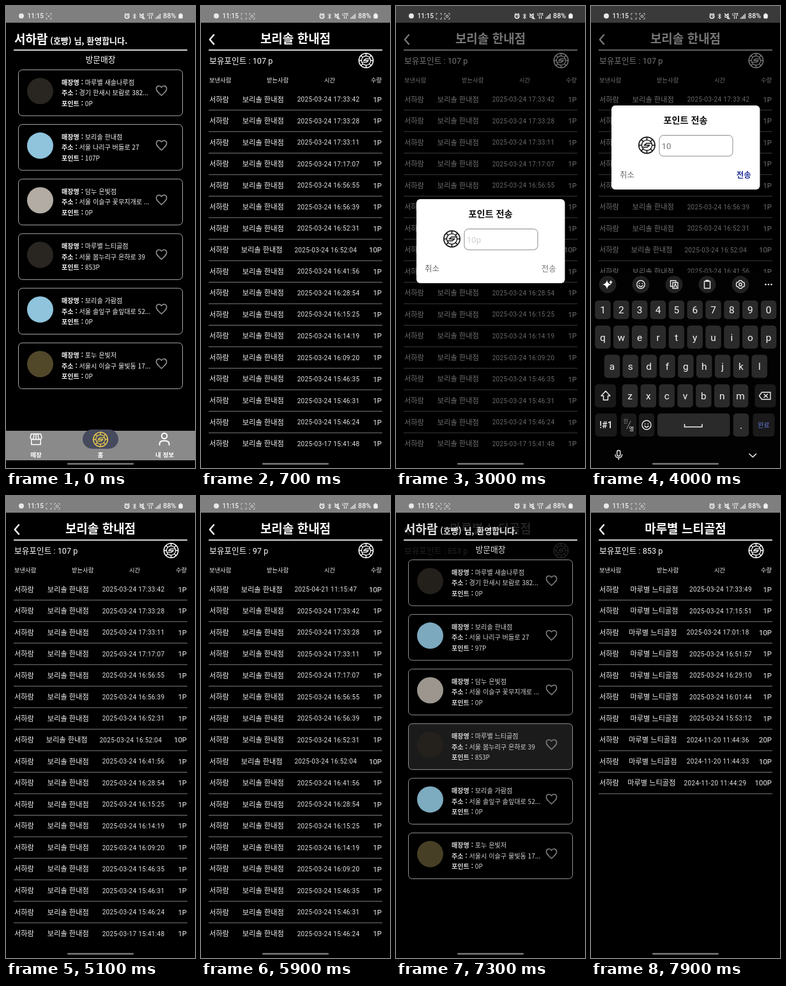
An HTML page that plays this animation: 296x720 px, repeating every 8 s.

```html
<!DOCTYPE html>
<html lang="ko">
<head>
<meta charset="utf-8">
<title>포인트 전송</title>
<style>
html, body { margin: 0; width: 100%; height: 100%; overflow: hidden; background: #000; }
svg { display: block; width: 100%; height: 100%; }
text { font-family: Roboto, "Noto Sans CJK KR", "Noto Sans CJK", sans-serif; white-space: pre; }
.ko { font-family: "Noto Sans CJK KR", "Noto Sans CJK", sans-serif; }
</style>
</head>
<body>
<svg id="stage" viewBox="0 0 296 720"></svg>
<script>
const LOOP = 8000;
const stage = document.getElementById('stage');

function add(parent, tag, attrs = {}) {
  const el = document.createElementNS('http://www.w3.org/2000/svg', tag);
  for (const k in attrs) el.setAttribute(k, attrs[k]);
  return parent.appendChild(el);
}
const group = (p, attrs) => add(p, 'g', attrs);
const rect = (p, x, y, width, height, fill, rx = 0, more) =>
  add(p, 'rect', { x, y, width, height, fill, rx, ...more });
const circle = (p, cx, cy, r, fill, more) => add(p, 'circle', { cx, cy, r, fill, ...more });
const line = (p, d, stroke, width, more) => add(p, 'path', {
  d, stroke, 'stroke-width': width, fill: 'none',
  'stroke-linecap': 'round', 'stroke-linejoin': 'round', ...more });

// y is the optical middle of the line
function text(p, x, y, str, size, fill = '#fff', more) {
  const el = add(p, 'text', { x, y: y + size * 0.365, 'font-size': size, fill, ...more });
  el.textContent = str;
  return el;
}
const mid = { 'text-anchor': 'middle' };
const bold = { 'font-weight': 700 };
const ko = { class: 'ko' };

// Lays out texts from 13 to 283 with equal gaps
function spread(items) {
  const widths = items.map(el => el.getComputedTextLength());
  const gap = (270 - widths.reduce((a, b) => a + b)) / (items.length - 1);
  let x = 13;
  items.forEach((el, i) => { el.setAttribute('x', x); x += widths[i] + gap; });
}

function chip(p, x, y, r, color) {
  const g = group(p, { transform: `translate(${x} ${y}) scale(${r / 12})` });
  circle(g, 0, 0, 11.2, 'none', { stroke: color, 'stroke-width': 1.5 });
  circle(g, 0, 0, 7.2, 'none', { stroke: color, 'stroke-width': 1.2 });
  for (let i = 0; i < 8; i++)
    line(g, 'M0 -11V-7.4', color, 1.4, { transform: `rotate(${i * 45})` });
  line(g, 'M6 -2.6H-.6L-3.8 0H3.8L.6 2.6H-6', color, 1.4);
}

/* ---------- home ---------- */
const me = '서하람';
const shops = [
  ['마루별 새솔나루점', '경기 한새시 보람로 382...', '0P', '#292520'],
  ['보리솔 한내점', '서울 나리구 버들로 27', '107P', '#8fc4dc'],
  ['담누 은빛점', '서울 이슬구 꽃무지개로 ...', '0P', '#b3aca4'],
  ['마루별 느티골점', '서울 봄누리구 은하로 39', '853P', '#292520'],
  ['보리솔 가람점', '서울 솔잎구 솔잎대로 52...', '0P', '#8fc4dc'],
  ['포누 은빛저', '서울시 이슬구 물빛동 17...', '0P', '#51482a']
];
rect(stage, 0, 0, 296, 720, '#000');
const home = group(stage);
text(home, 13, 52, me, 19, '#fff', { ...bold, ...ko });
text(home, 69, 54, '(호빵) 님, 환영합니다.', 13, '#fff', { ...bold, ...ko });
rect(home, 12, 67.8, 272, 1.7, '#fff');
text(home, 148, 83, '방문매장', 12.8, '#fff', { ...mid, ...ko });

const points = [], glow = [];
shops.forEach(([name, address, point, color], i) => {
  const g = group(home, { transform: `translate(0 ${i * 85.1})` });
  glow.push(rect(g, 19.5, 99.5, 257, 71.5, '#fff', 6, { opacity: 0 }));
  rect(g, 19.5, 99.5, 257, 71.5, 'none', 6, { stroke: '#a8a8a8' });
  circle(g, 53.5, 132.5, 20.5, color);
  [['매장명 : ', name], ['주소 : ', address], ['포인트 : ', point]].forEach(([label, value], n) => {
    const row = text(g, 87, 119 + n * 16.6, '', 10.1, '#f2f2f2', ko);
    add(row, 'tspan', bold).textContent = label;
    const span = add(row, 'tspan');
    span.textContent = value;
    if (n === 2) points.push(span);
  });
  line(g, 'M243.5 139.5C238 134.6 235.4 132.2 235.4 129C235.4 124.2 240.9 122.9 243.5 126.8C246.1 122.9 251.6 124.2 251.6 129C251.6 132.2 249 134.6 243.5 139.5Z', '#8c8c8c', 1.6);
});

const nav = group(home);
rect(nav, 0, 662, 296, 46, '#8a8a8a');
rect(nav, 120, 660, 56, 30, '#454a5d', 15);
chip(nav, 148, 675.5, 12, '#e8c94e');
line(nav, 'M39.5 667H54.5L56 672.5Q55 676 52.4 675Q50 676.5 47 675Q44.5 676.5 42 675Q39 676 38 672.5ZM39.8 676V683.5H54.2V676M44 667L43 674M50 667L51 674M47 667V674', '#fff', 1.5);
circle(nav, 248, 670, 4.2, 'none', { stroke: '#fff', 'stroke-width': 2 });
line(nav, 'M240.5 684V682Q241 677.5 248 677.5Q255 677.5 255.5 682V684', '#fff', 2);
[[47, '매장'], [148, '홈'], [248.5, '내 정보']].forEach(([x, s]) =>
  text(nav, x, 699, s, 9.6, '#fff', { ...mid, ...bold, ...ko }));

/* ---------- shop pages ---------- */
const day = (date, list) => list.split(' ').map(s => {
  const [time, n = 1] = s.split('/');
  return [`${date} ${time}`, n + 'P'];
});
const older = [
  ...day('2025-03-24', '17:33:42 17:33:28 17:33:11 17:17:07 16:56:55 16:56:39 16:52:31 16:52:04/10 16:41:56 16:28:54 16:15:25 16:14:19 16:09:20 15:46:35 15:46:31 15:46:24'),
  ...day('2025-03-17', '15:41:48')
];
const newer = [...day('2025-04-21', '11:15:47/10'), ...older.slice(0, 16)];
const other = [
  ...day('2025-03-24', '17:33:49 17:15:51 17:01:18/10 16:51:57 16:29:10 16:01:44 15:53:12'),
  ...day('2024-11-20', '11:44:36/20 11:44:33/10 11:44:29/100')
];

function page(shop, total, rows) {
  const g = group(stage);
  rect(g, 0, 26, 296, 682, '#000');
  line(g, 'M20 45L13.8 52.2L20 59.4', '#fff', 2.4);
  text(g, 148, 51.5, shop, 19, '#fff', { ...mid, ...bold, ...ko });
  rect(g, 12, 67.8, 272, 1.7, '#fff');
  text(g, 13, 85, `보유포인트 : ${total} p`, 12.7);
  chip(g, 258.5, 85, 12, '#fff');
  const list = group(g);
  spread(['보낸사람', '받는사람', '시간', '수량'].map(s =>
    text(list, 0, 116, s, 9.3, '#f0f0f0', { ...ko, 'font-weight': 500 })));
  rows.forEach(([time, amount], i) => {
    const y = 145.5 + i * 33.53;
    spread([
      text(list, 0, y, me, 11.2, '#f0f0f0', ko),
      text(list, 0, y, shop, 11.2, '#f0f0f0', ko),
      text(list, 0, y, time, 10, '#e4e4e4', { 'letter-spacing': 0.33 }),
      text(list, 0, y, amount, 11.4, '#f0f0f0')
    ]);
    if (i < 16) rect(list, 12, y + 16.2, 272, 1, '#7c7c7c');
  });
  return { g, list };
}
const before = page(shops[1][0], 107, older);
const after = page(shops[1][0], 97, newer);
const second = page(shops[3][0], 853, other);

/* ---------- status bar ---------- */
const bar = group(stage);
rect(bar, 0, 0, 296, 26, '#7f7f7f');
const shade = rect(stage, 0, 0, 296, 720, '#000');
const status = group(stage);
circle(status, 24, 15.5, 4, '#e8e8e8');
text(status, 33.5, 15.5, '11:15', 10, '#f2f2f2', { 'font-weight': 500 });
const frame = x => line(status, `M${x - 2.3} 11.5H${x - 4}V14M${x + 2.3} 11.5H${x + 4}V14M${x - 2.3} 20.5H${x - 4}V18M${x + 2.3} 20.5H${x + 4}V18`, '#dcdcdc', 0.8);
frame(67);
const dot = line(status, 'M65.5 14.5L68.5 17.5M68.5 14.5L65.5 17.5', '#dcdcdc', 0.9);
const extra = group(status);
extra.append(frame(80), circle(status, 80, 16, 1.8, 'none', { stroke: '#dcdcdc' }));
circle(status, 189.5, 16, 3.2, 'none', { stroke: '#f2f2f2', 'stroke-width': 1.6 });
line(status, 'M186 12.5L187.5 11.5M193 12.5L191.5 11.5M189.5 14.5V16H191', '#f2f2f2', 1);
line(status, 'M199 13.5L203.5 18L201.2 20V12L203.5 14L199 18.5', '#f2f2f2', 1);
line(status, 'M210 14.5H212L215 12V20L212 17.5H210ZM209.5 12L217 20', '#f2f2f2', 1.2);
text(status, 226, 12.8, 'LTE', 6, '#f2f2f2', { ...mid, ...bold });
line(status, 'M224.5 19.5V16M227.5 16V19.5', '#f2f2f2', 1.1);
for (let i = 0; i < 4; i++) rect(status, 234 + i * 2.2, 18 - i * 2, 1.5, 2 + i * 2, '#e0e0e0');
text(status, 246, 15.5, '88%', 10.8, '#f2f2f2', { 'font-weight': 500 });
rect(status, 270.3, 12.5, 6.5, 7, '#f2f2f2', 1.4);
rect(status, 272.2, 11.3, 2.6, 1.5, '#f2f2f2');

/* ---------- dialog ---------- */
const dialog = group(stage);
rect(dialog, 32, 301, 232.5, 131, '#fff', 6);
text(dialog, 148, 324, '포인트 전송', 14.2, '#111', { ...mid, ...bold, ...ko });
chip(dialog, 87.5, 363, 13.5, '#111');
rect(dialog, 107, 347.5, 115, 32.5, '#fff', 6.5, { stroke: '#8a8a8a' });
const input = text(dialog, 110.5, 364.5, '', 13.5);
const caret = rect(dialog, 110, 355.5, 1, 17, '#555');
text(dialog, 45, 409, '취소', 12.5, '#6a6a6a', ko);
const send = text(dialog, 227.8, 409, '전송', 12.5, '', ko);

/* ---------- keyboard ---------- */
const board = group(stage);
rect(board, 0, 416, 296, 304, '#020202');
const plain = '#2a2a2b', dark = '#1a1a1b', pressed = '#505256';
const keys = {};
function key(x, y, w, h, label, size = 15.5, fill = plain, color = '#f4f4f4', more) {
  keys[label] = rect(board, x - w / 2, y - h / 2, w, h, fill, 5);
  text(board, x, y, label, size, color, { ...mid, ...more });
}
const ink = (d, w = 1.4, color = '#eee') => line(board, d, color, w);
const face = (x, y, r) => {
  circle(board, x, y, r, 'none', { stroke: '#eee', 'stroke-width': 1.4 });
  ink(`M${x - 3} ${y + 1.5}Q${x} ${y + 5.5} ${x + 3} ${y + 1.5}`);
  for (const s of [-1, 1]) circle(board, x + s * 2.3, y - 1.7, 0.9, '#eee');
};
for (let i = 0; i < 5; i++) circle(board, 26 + i * 52, 434, 13.5, '#212122');
add(board, 'path', { fill: '#fff', d: 'M25 427Q26 433 32 434Q26 435 25 441Q24 435 18 434Q24 433 25 427ZM31 427L32 429.5L34 430.5L32 431.5L31 434L30 431.5L28 430.5L30 429.5Z' });
face(78, 434, 6.2);
ink('M127 437H124.5V428H133V430M128 431H136V440H128ZM130 438L132 433L134 438');
ink('M177.5 429H186.5V440H177.5ZM180 429V427.5H184V429');
circle(board, 234, 434, 2.2, 'none', { stroke: '#eee', 'stroke-width': 1.4 });
ink('M232 428H236L237 430L240 431L240.5 434L240 437L237 438L236 440H232L231 438L228 437L227.5 434L228 431L231 430Z');
for (let i = 0; i < 3; i++) circle(board, 273.5 + i * 4.5, 434, 1.3, '#eee');

[['1234567890', 18.5, 473.5, 29], ['qwertyuiop', 18.5, 516, 36],
 ['asdfghjkl', 33, 561.5, 36], ['zxcvbnm', 61, 607.5, 36]].forEach(([chars, x, y, h]) =>
  [...chars].forEach((c, i) => key(x + i * 28.85, y, 24.5, h, c)));
key(22.5, 607.5, 33, 36, '', 15, dark);
ink('M23 600L30 607.5H26.5V614H19.5V607.5H16Z');
key(273, 607.5, 33, 36, '', 15, dark);
ink('M267.5 602H281V613H267.5L263.5 607.5ZM271 605L276.5 610M276.5 605L271 610');
key(23.5, 653, 34, 36, '!#1', 14, dark, '#f4f4f4', { 'font-weight': 500 });
key(59, 653, 24.5, 36, '', 15, dark);
text(board, 54.5, 647.5, '한', 8, '#8a8a8a', { ...mid, ...ko });
text(board, 63.5, 659, '영', 8.5, '#eee', { ...mid, ...ko });
ink('M56 659L62 647', 0.9, '#aaa');
key(87, 653, 24.5, 36, '', 15, dark);
face(87, 653, 7);
rect(board, 104, 635, 113.5, 36, plain, 5);
ink('M146.5 652V656H174V652', 1.6);
key(235, 653, 24.5, 36, '.', 17);
key(270.5, 653, 34, 36, '완료', 10, dark, '#5f78cf');
rect(board, 40.8, 692.5, 5, 9, 'none', 2.5, { stroke: '#eee', 'stroke-width': 1.4 });
ink('M38 699Q38 704 43.3 704Q48.6 704 48.6 699M43.3 704V707');
ink('M248 698L253.3 703L258.6 698', 1.6);

rect(stage, 96, 712.3, 104, 2.4, '#7c7c7c', 1.2);

/* ---------- motion ---------- */
const ramp = (t, a, b) => Math.min(1, Math.max(0, (t - a) / (b - a)));
const ease = p => 1 - (1 - p) ** 3;
const within = (t, a, b) => t >= a && t < b;
const fade = (el, v) => {
  el.setAttribute('opacity', v);
  el.setAttribute('visibility', v > 0 ? 'visible' : 'hidden');
};
const shift = (el, y) => el.setAttribute('transform', `translate(0 ${y})`);
// The list arrives after the page has begun to fade in
function show(p, v, loaded) {
  fade(p.g, v);
  p.list.setAttribute('visibility', v > 0 && loaded ? 'visible' : 'hidden');
}

function draw(t) {
  const sent = t >= 5200;
  const first = ramp(t, 540, 695) * (1 - ramp(t, 6700, 6900));
  show(before, sent ? 0 : first, t >= 660);
  show(after, sent ? first : 0, true);
  show(second, ramp(t, 7280, 7440), t >= 7400);

  points[1].textContent = sent ? '97P' : '107P';
  fade(glow[1], t < 800 ? 0.11 * ramp(t, 200, 350) : 0);
  fade(glow[3], 0.12 * ramp(t, 7050, 7200));
  fade(nav, t < 450 || within(t, 6850, 7200) ? 1 : 0);

  const open = ramp(t, 2550, 2750) * (1 - ramp(t, 4750, 4950));
  fade(shade, 0.54 * open);
  fade(dialog, open);

  const up = ease(ramp(t, 3250, 3550)) * (1 - ease(ramp(t, 4350, 4700)));
  shift(dialog, -146 * up);
  shift(board, 304 * (1 - up));
  fade(board, up > 0 ? 1 : 0);

  const typed = t < 3680 ? '' : t < 3880 ? '1' : '10';
  input.textContent = typed || '10p';
  input.setAttribute('fill', typed ? '#777' : '#d0d0d0');
  fade(caret, within(t, 3250, 3680) ? 1 : 0);
  send.setAttribute('fill', typed ? '#25349a' : '#777');
  send.setAttribute('font-weight', typed ? 700 : 400);
  keys['1'].setAttribute('fill', within(t, 3640, 3740) ? pressed : plain);
  keys['0'].setAttribute('fill', within(t, 3840, 3940) ? pressed : plain);

  fade(dot, t < 200 || within(t, 6400, 7900) ? 1 : 0);
  fade(extra, t < 200 ? 0 : 1);
}

const start = performance.now();
function tick() {
  draw((performance.now() - start) % LOOP);
  requestAnimationFrame(tick);
}
draw(0);
requestAnimationFrame(tick);
</script>
</body>
</html>
```
